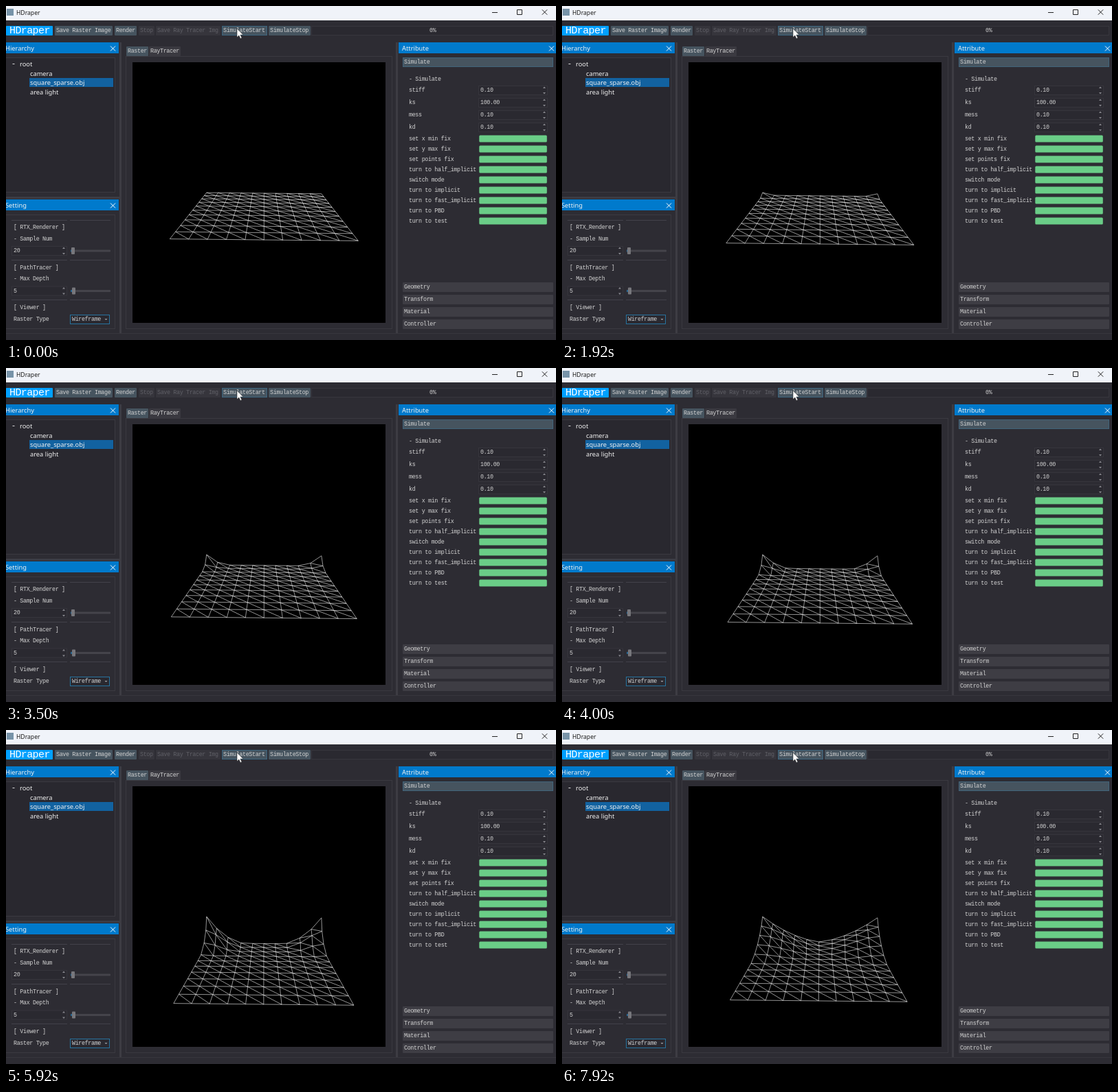
An HTML page that plays this animation: 800x487 px, repeating every 8 s.

```html
<!DOCTYPE html>
<html lang="en">
<head>
<meta charset="utf-8">
<title>Cloth simulation</title>
<style>
html, body { margin: 0; width: 100%; height: 100%; overflow: hidden; background: #2d2c33; }
svg { display: block; width: 100vw; height: 100vh; }
text { fill: #f2f2f2; dominant-baseline: central; white-space: pre; }
.ui { font: 9.3px "Noto Sans", sans-serif; }
.mono { font: 8.4px "Liberation Mono", monospace; letter-spacing: -.36px; fill: #d2d2d2; }
.title { font-size: 8.6px; fill: #1b1b1b; }
.brand { font-size: 15px; letter-spacing: -.6px; fill: #fff; }
.off { fill: #606067; }
</style>
</head>
<body>
<svg id="stage" viewBox="0 0 800 487" preserveAspectRatio="none"></svg>
<script>
const stage = document.getElementById('stage');

function add(tag, attrs, content) {
  const el = document.createElementNS('http://www.w3.org/2000/svg', tag);
  for (const key in attrs) el.setAttribute(key, attrs[key]);
  if (content) el.textContent = content;
  return stage.appendChild(el);
}
const box = (x, y, width, height, fill, more) => add('rect', { x, y, width, height, fill, ...more });
const frame = (x, y, w, h, stroke, fill = 'none') => box(x + .5, y + .5, w - 1, h - 1, fill, { stroke });
const stroke = (d, color, width = 1) => add('path', { d, fill: 'none', stroke: color, 'stroke-width': width });
const label = (x, y, s, cls = 'mono') => add('text', { x, y: y + .4, class: cls }, s);
const cross = (x, y, r, color) =>
  stroke(`M${x - r} ${y - r}l${2 * r} ${2 * r}M${x + r} ${y - r}l${-2 * r} ${2 * r}`, color);

function button(x, y, w, s, { fill = '#46545f', off = false, border } = {}) {
  box(x, y, w, 14, off ? '#36353c' : fill, { rx: 1 });
  if (border) frame(x, y, w, 14, border);
  label(x + 2, y + 7, s, off ? 'mono off' : 'mono');
}
function dockHeader(x, y, w, s) {
  box(x, y, w, 16, '#007acc');
  label(x ? x + 5 : -1, y + 7.6, s, 'ui');
  cross(x + w - 8.5, y + 9, 3.5, '#fff');
}
function spinBox(x, y, w, value) {
  frame(x, y - 7, w, 14, '#36353c', '#2a2930');
  label(x + 3, y, value);
  const a = x + w - 5;
  add('path', { d: `M${a - 2} ${y - 3}h4l-2 -2.5zM${a - 2} ${y + 3}h4l-2 2.5z`, fill: '#88888e' });
}
function slider(x, y, handle) {
  box(x, y - 1.5, 58, 3, '#45444b', { rx: 1 });
  box(x, y - 1.5, handle - x, 3, '#28658f');
  box(handle, y - 5, 5, 10, '#77777c', { rx: 1 });
}

function drawWindow() {
  box(0, 0, 800, 487, '#2d2c33');
  box(0, 0, 800, 21, '#f0f3f9');
  box(1, 4, 10, 10, '#7793a8');
  label(15, 9.2, 'HDraper', 'ui title');
  stroke('M707 9.5h8M743.5 5.5h7v7h-7z', '#222');
  cross(783.5, 9, 3.7, '#222');

  box(0, 29, 68, 14, '#00a0ff', { rx: 1 });
  label(5, 36.5, 'HDraper', 'mono brand');
  button(71, 29, 84, 'Save Raster Image');
  button(158, 29, 32, 'Render');
  button(193, 29, 23, 'Stop', { off: true });
  button(218, 29, 94, 'Save Ray Tracer Img', { off: true });
  button(314, 29, 66, 'SimulateStart', { border: '#3d667f' });
  button(382, 29, 61, 'SimulateStop');
  frame(444, 29, 352, 14, '#37363d', '#2a2930');
  label(616, 36, '0%');

  box(165, 53, 3, 424, '#3d3c43');
  box(567, 53, 3, 424, '#3d3c43');
  box(0, 278, 165, 3, '#3d3c43');
  box(0, 477, 800, 1, '#37363d');
}

function drawLeftDocks() {
  dockHeader(0, 53, 164, 'Hierarchy');
  frame(-1, 75, 160, 197, '#3b3a41', '#29282f');
  box(34, 105, 122, 13, '#1262a0');
  box(9.5, 84, 3, 1, '#ddd');
  label(20, 84, 'root', 'ui');
  ['camera', 'square_sparse.obj', 'area light'].forEach((s, i) => label(35, 97.6 + 13.5 * i, s, 'ui'));

  dockHeader(0, 282, 164, 'Setting');
  frame(-1, 304, 160, 167, '#3b3a41');
  for (const y of [312, 370, 428]) stroke(`M8 ${y}.5h81M93 ${y}.5h59`, '#42414a');
  label(11, 323, '[ RTX_Renderer ]');
  label(11, 339.5, '- Sample Num');
  spinBox(8, 357, 81, '20');
  slider(94, 357, 95);
  label(11, 381.5, '[ PathTracer ]');
  label(11, 397.5, '- Max Depth');
  spinBox(8, 415.5, 81, '5');
  slider(94, 415.5, 96);
  label(11, 439.5, '[ Viewer ]');
  label(11, 457, 'Raster Type');
  frame(93, 450, 58, 14, '#27739f', '#2a2930');
  label(96, 457, 'Wireframe');
  add('path', { d: 'M143.5 456h4l-2 2z', fill: '#a0a0a4' });
}

function drawRightDock() {
  dockHeader(571, 53, 231, 'Attribute');
  button(577, 75, 219, 'Simulate', { border: '#41647a' });
  label(586, 106.5, '- Simulate');
  [['stiff', '0.10'], ['ks', '100.00'], ['mess', '0.10'], ['kd', '0.10']].forEach(([name, value], i) => {
    label(586, 123 + 18 * i, name);
    spinBox(687, 123 + 18 * i, 101, value);
  });
  ['set x min fix', 'set y max fix', 'set points fix', 'turn to half_implicit', 'switch mode',
    'turn to implicit', 'turn to fast_implicit', 'turn to PBD', 'turn to test'].forEach((s, i) => {
    label(586, 193.5 + 15 * i, s);
    box(688.3, 188.6 + 15 * i, 98.5, 10, '#6acd87', { rx: 1.5 });
  });
  ['Geometry', 'Transform', 'Material', 'Controller'].forEach((s, i) =>
    button(577, 403 + 18 * i, 219, s, { fill: '#3e3d44' }));
}

function drawViewer() {
  button(175, 59, 32, 'Raster');
  button(208, 59, 46, 'RayTracer', { fill: '#3a3940' });
  frame(174, 73, 388, 398, '#3a3940');
  box(184, 82, 368, 380, '#000');
}

drawWindow();
drawLeftDocks();
drawRightDock();
drawViewer();
const cloth = add('path', { fill: 'none', stroke: '#fff', 'stroke-width': .58, 'stroke-linejoin': 'round' });
add('path', {
  d: 'M336 33v12.5l2.9 -2.6 2 4.6 2 -.9 -2 -4.5h4z',
  fill: '#fff', stroke: '#222', 'stroke-width': .5
});

const LOOP = 8000, N = 10, SIZE = 274, CELL = SIZE / N;
const FOCAL = 415, SIN = .2447, COS = .9696, ROLL = .01;

// Tables of [seconds, value]
const LATE_DROP = [[4.34, 40.5], [4.59, 54.5], [4.84, 64.3], [5.2, 66.8], [5.92, 67.5], [7, 66.7], [8, 66.4]];
const REACH = [[0, 1.08], [2.92, 1.15], [4, 2.2], [5.92, 3.2], [7, 4.2], [7.92, 5.2], [8, 5.25]];
const DRIFT = [[4.6, 0], [5.92, 2.5], [7, 8], [7.92, 10.5], [8, 10.6]];

function sample(table, t) {
  if (t <= table[0][0]) return table[0][1];
  const i = table.findIndex(([time]) => time >= t);
  if (i < 0) return table[table.length - 1][1];
  const [t0, a] = table[i - 1], [t1, b] = table[i];
  return a + (b - a) * (t - t0) / (t1 - t0);
}

// Free fall first, then the fall is arrested
const dropAt = t => t < 4.34 ? (1.575 * Math.max(0, t - .3)) ** 2 : sample(LATE_DROP, t);

function project(x, drop, depth) {
  const z = FOCAL + depth * COS + drop * SIN;
  const y = 69.5 - depth * SIN + drop * COS;
  const sx = FOCAL * x / z;
  return [375.3 + sx, 271.5 + FOCAL * y / z + sx * ROLL];
}

// Points near the two pinned far corners lag behind and are drawn towards them
function clothPoint(i, j, drop, reach, drift) {
  const side = i <= N / 2 ? -1 : 1;
  const across = Math.min(i, N - i);
  const r = Math.hypot(across, j);
  const q = Math.min(1, r / reach);
  const pull = r ? drop * .8 * q * (1 - q) / r : 0;
  return project(
    (i - N / 2) * CELL + side * across * pull * .4 - .2 * drift * q,
    drop * (1 - (1 - q) ** 1.5),
    (N - j) * CELL + j * pull + drift * q
  );
}

function clothPath(t) {
  const drop = dropAt(t), reach = sample(REACH, t), drift = sample(DRIFT, t);
  const at = (i, j) => clothPoint(i, j, drop, reach, drift).map(v => v.toFixed(2)).join(' ');
  let d = '';
  for (let j = 0; j <= N; j++) {
    for (let i = 0; i <= N; i++) {
      const p = at(i, j);
      if (i < N) d += `M${p}L${at(i + 1, j)}`;
      if (j < N) d += `M${p}L${at(i, j + 1)}`;
      if (i < N && j < N) d += `M${p}L${at(i + 1, j + 1)}`;
    }
  }
  return d;
}

const start = performance.now();
function tick() {
  const t = (performance.now() - start) % LOOP / 1000;
  cloth.setAttribute('d', clothPath(t));
  requestAnimationFrame(tick);
}
tick();
</script>
</body>
</html>
```
